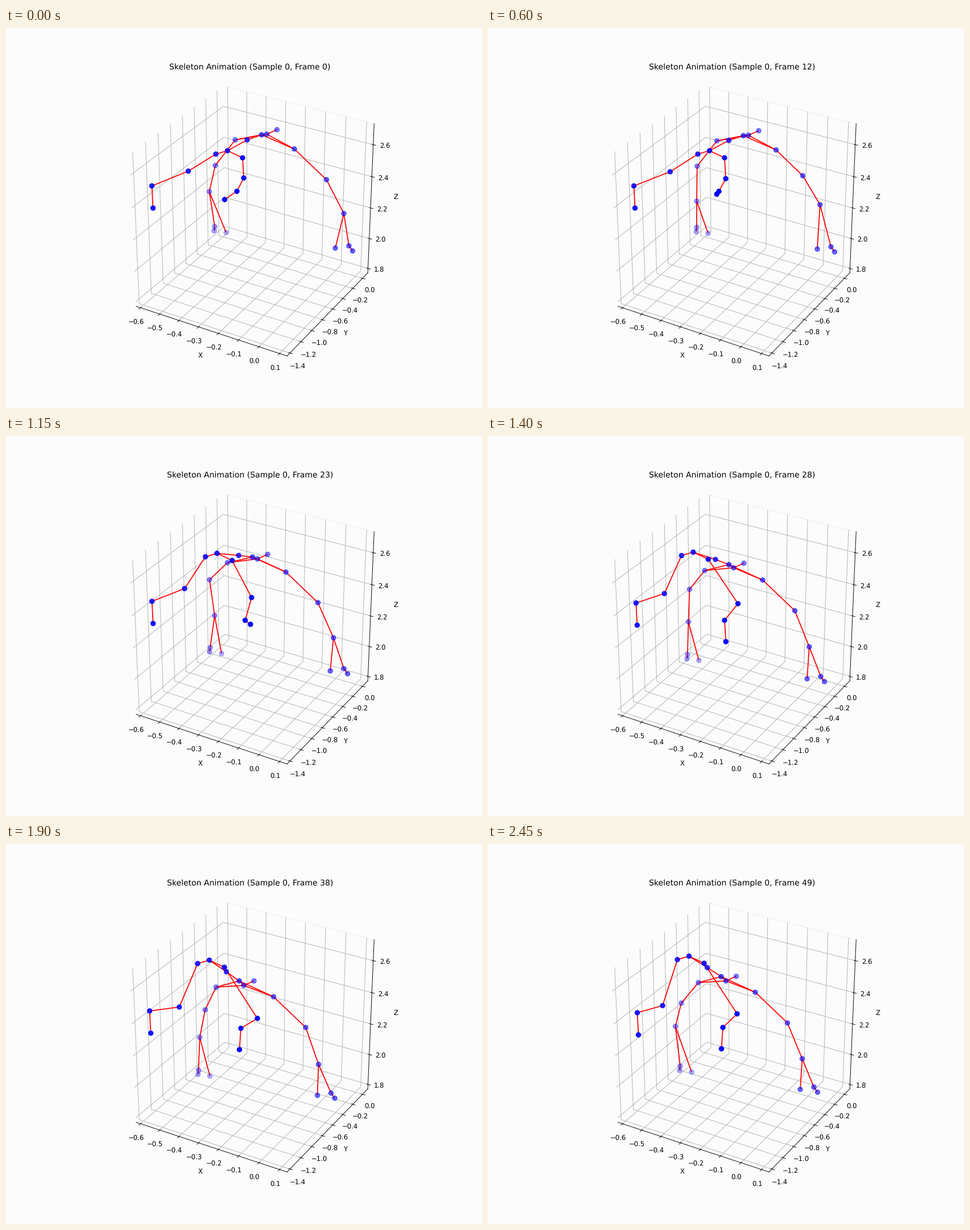
A matplotlib script for the animation above (2500 ms loop, 837 by 669 pixels).

```python
import numpy as np
import matplotlib.pyplot as plt
from matplotlib.animation import FuncAnimation
from matplotlib.collections import LineCollection

W, H, DPI = 837, 669, 83.7
FRAMES, INTERVAL = 50, 50
PAPER = "#fcfcfc"
plt.rcParams["text.hinting"] = "none"

# Starting pose in stage pixels; opacity runs evenly along each limb.
LIMBS = [
    ((.86, .51), dict(base=(389.5, 216), waist=(424, 197), chest=(449.5, 188),
                      neck=(458.5, 187), head=(476.5, 179))),
    ((.84, .90), dict(hip_l=(369, 222), knee_l=(320.5, 252),
                      ankle_l=(256.5, 278), foot_l=(258.5, 317))),
    ((.90, 1.0), dict(hip_r=(416, 228.5), knee_r=(418, 264),
                      ankle_r=(406, 287.5), foot_r=(384.5, 302))),
    ((.50, .30), dict(shoulder_l=(403, 197), elbow_l=(368, 242), wrist_l=(357.5, 288),
                      hand_l=(367, 349.5), tip_l=(366, 357), thumb_l=(387, 360))),
    ((.62, .58), dict(shoulder_r=(507, 213), elbow_r=(563.5, 267), wrist_r=(594, 326.5),
                      hand_r=(603, 383.5), tip_r=(609.5, 392.5), thumb_r=(579, 387.5))),
]
NAMES = [name for _, joints in LIMBS for name in joints]
START = np.array([p for _, joints in LIMBS for p in joints.values()], dtype=float)
ALPHA = np.concatenate([np.linspace(*span, len(joints)) for span, joints in LIMBS])
ORDER = np.argsort(ALPHA)

CHAINS = [
    "base waist chest neck head",
    "base hip_l knee_l ankle_l foot_l",
    "base hip_r knee_r ankle_r foot_r",
    "chest shoulder_l elbow_l wrist_l hand_l tip_l",
    "chest shoulder_r elbow_r wrist_r hand_r tip_r",
    "shoulder_l neck shoulder_r",
    "wrist_l thumb_l",
    "wrist_r thumb_r",
]


def index(names):
    return [NAMES.index(n) for n in names.split()]


BONES = np.array([pair for chain in CHAINS
                  for pair in zip(index(chain), index(chain)[1:])])

# The body sinks to the left (shift), then rises a little (back).
SINK_X, SINK_Y, RISE = (10, 40), (9, 38), (40, 49)
LATE, HIP_X, HIP_Y = (14, 40), (12, 32), (15, 26)
STEP, KICK = (12, 22), (18, 28)
MOVES = [  # joints, shift, x span, y span, back
    ("chest", (-40, 53), SINK_X, SINK_Y, (.5, -7.5)),
    ("neck head", (-41, 62), SINK_X, SINK_Y, (1, -8)),
    ("waist", (-37, 28), SINK_X, SINK_Y, (-1.5, -7.5)),
    ("base hip_l hip_r", (-32, -11.5), HIP_X, HIP_Y, (-4, -7)),
    ("knee_l", (-16, 35), SINK_X, SINK_Y, (2.5, -2.5)),
    ("ankle_l foot_l", (-4, 16), LATE, HIP_Y, (10, 3)),
    ("knee_r", (24, 43), HIP_X, SINK_Y, (-4, -8)),
    ("ankle_r", (7, 37), STEP, STEP, (0, -1.5)),
    ("foot_r", (26, 60), (0, 14), KICK, (0, -1.5)),
    ("shoulder_l", (-34, 55), SINK_X, SINK_Y, (1, -8)),
    ("shoulder_r elbow_r", (-37, 56), SINK_X, SINK_Y, (0, -8)),
    ("elbow_l", (-18, 50), SINK_X, SINK_Y, (-10, -12)),
    ("wrist_l", (-17, 52.5), SINK_X, SINK_Y, (-11, -19.5)),
    ("hand_l tip_l thumb_l", (-29, 48.5), LATE, SINK_Y, (0, -7)),
    ("wrist_r", (-45, 61.5), SINK_X, SINK_Y, (3.5, -10)),
    ("hand_r tip_r thumb_r", (-32, 55), LATE, SINK_Y, (2, -10.5)),
]
GESTURES = [  # joints, time, width, offset
    ("elbow_r", 13, 5, (-10, -9)),
    ("wrist_r", 13, 5, (-10, -18)),
    ("wrist_l", 13, 5, (10, 16)),
    ("wrist_l", 23, 5, (16, 3)),
    ("elbow_l", 24, 6, (-3, -13)),
    ("ankle_l foot_l", 28, 4, (6, 0)),
    ("ankle_r", 24, 4, (8, 0)),
    ("foot_r", 14, 5, (-8, -11)),
    ("foot_r", 24, 4, (21, 0)),
]


def ease(t, span):
    s = np.clip((t - span[0]) / (span[1] - span[0]), 0, 1)
    return s * s * (3 - 2 * s)


def pose(t):
    points = START.copy()
    for names, shift, xspan, yspan, back in MOVES:
        points[index(names)] += (np.array(shift) * (ease(t, xspan), ease(t, yspan))
                                 + np.array(back) * ease(t, RISE))
    for names, mid, width, offset in GESTURES:
        points[index(names)] += np.array(offset) * np.exp(-((t - mid) / width) ** 2)
    return points


# The tiny margin keeps the pixel size from rounding down.
fig = plt.figure(figsize=((W + .01) / DPI, (H + .01) / DPI), dpi=DPI, facecolor=PAPER)

ax = fig.add_subplot(projection="3d", facecolor="none")
ax.set_box_aspect((1, 1, 1))
ax.set_xlim(-.6232, .1361)
ax.set_ylim(-1.4511, .1116)
ax.set_zlim(1.7703, 2.7284)
ax.set_xlabel("X")
ax.set_ylabel("Y")
ax.set_zlabel("Z")
for axis in (ax.xaxis, ax.yaxis, ax.zaxis):
    axis.set_pane_color((.988, .988, .988, 1))
ax.yaxis.pane.set_edgecolor("#efefef")
title = ax.set_title("")

# Flat layer in stage pixels for the skeleton.
layer = fig.add_axes([0, 0, 1, 1])
layer.set_xlim(0, W)
layer.set_ylim(H, 0)
layer.axis("off")
bones = layer.add_collection(LineCollection([], colors="red", linewidths=1.5, zorder=1),
                             autolim=False)
dots = layer.scatter(*START[ORDER].T, s=50, zorder=2,
                     c=[(0, 0, 1, a) for a in ALPHA[ORDER]])


def draw(frame):
    points = pose(frame)
    bones.set_segments(points[BONES])
    dots.set_offsets(points[ORDER])
    title.set_text(f"Skeleton Animation (Sample 0, Frame {frame})")
    return bones, dots, title


anim = FuncAnimation(fig, draw, frames=FRAMES, interval=INTERVAL,
                     repeat=True, repeat_delay=0, blit=False)
plt.show()
```
